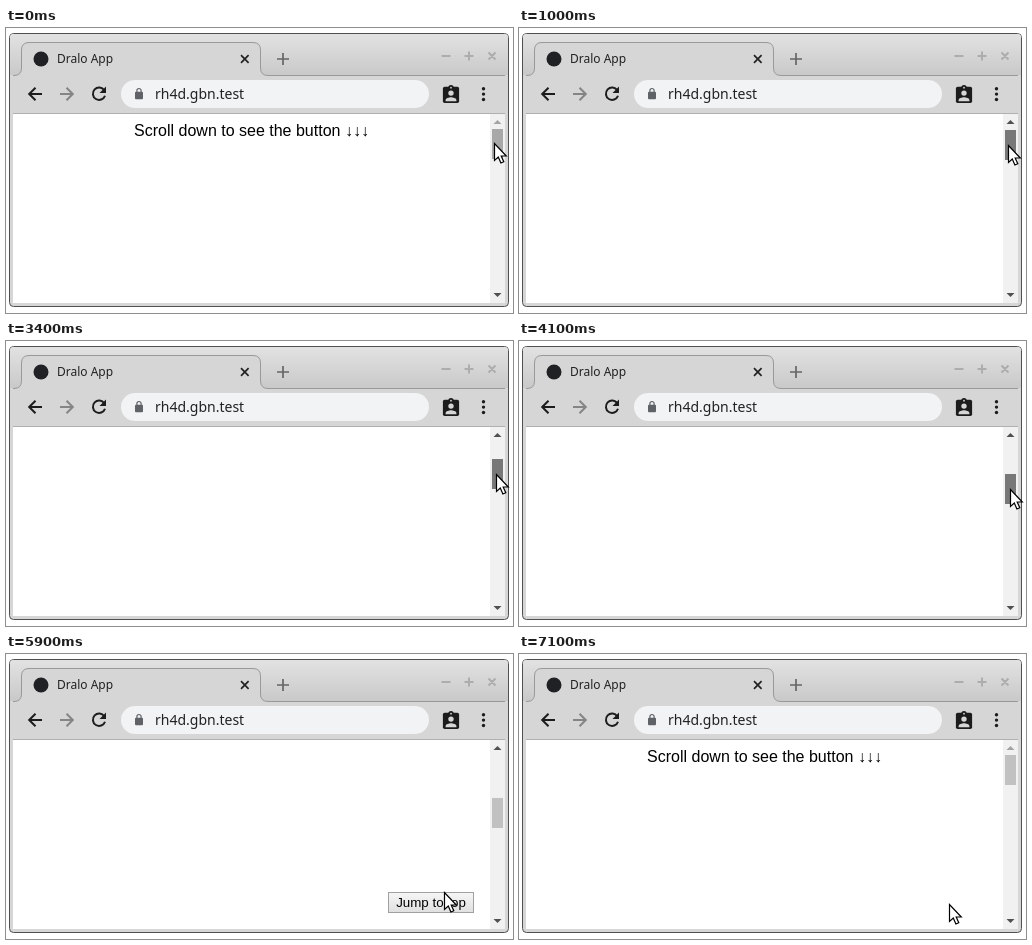
These frames come from a looping animation (507x285 px, 8500 ms). An HTML page:

```html
<!DOCTYPE html>
<html lang="en">
<head>
<meta charset="utf-8">
<title>Scroll demo</title>
<style>
  html, body { margin: 0; width: 100%; height: 100%; overflow: hidden; background: #fff; }
  svg { display: block; width: 100%; height: 100%; }
  .ui { font-family: "Noto Sans", sans-serif; }
  .page { font-family: "Liberation Sans", Arial, sans-serif; text-anchor: middle; }
  .line { fill: none; stroke-width: 2; }
  .thin { stroke-width: 1.7; }
</style>
</head>
<body>
<svg viewBox="0 0 507 285">
  <defs>
    <linearGradient id="titleBar" x2="0" y2="1">
      <stop stop-color="#e2e2e2"/><stop offset="1" stop-color="#c9c9c9"/>
    </linearGradient>
    <linearGradient id="buttonFace" x2="0" y2="1">
      <stop stop-color="#f6f6f6"/><stop offset="1" stop-color="#e0e0e0"/>
    </linearGradient>
    <clipPath id="view"><rect x="7" y="86" width="477" height="189"/></clipPath>
  </defs>

  <!-- Window frame and tab strip -->
  <rect x="3.5" y="5.5" width="499" height="273" rx="4" fill="#d6d6d6" stroke="#505050"/>
  <path d="M4 47V9q0-3 3-3H499q3 0 3 3V47Z" fill="url(#titleBar)"/>
  <path d="M7 47.5H8Q15.5 47.5 15.5 40V22Q15.5 14.5 23 14.5H247Q254.5 14.5 254.5 22V40Q254.5 47.5 262 47.5H499"
        fill="#d6d6d6" stroke="#999"/>
  <circle cx="35" cy="31" r="7.5" fill="#202124"/>
  <text class="ui" x="51" y="35" font-size="12" fill="#222">Dralo App</text>
  <path class="line thin" d="M235 27.2l7.6 7.6m0-7.6l-7.6 7.6" stroke="#222"/>
  <path class="line thin" d="M271 31h12m-6-6v12" stroke="#666"/>
  <path class="line" d="M435.5 28h9M458.5 28h9m-4.5-4.5v9M482.5 24.5l7 7m0-7l-7 7" stroke="#adadad"/>

  <!-- Toolbar -->
  <path class="line" d="M36 66H23.5m6-6.3L23.2 66l6.3 6.3" stroke="#1c1c1c"/>
  <path class="line" d="M54 66H66.5m-6-6.3L66.8 66l-6.3 6.3" stroke="#858585"/>
  <path class="line" d="M98.3 62.3A6.2 6.2 0 1 0 99 67.7" stroke="#1c1c1c"/>
  <path d="M100 58.5v6.500h-6.500Z" fill="#1c1c1c"/>
  <rect x="115" y="52" width="308" height="28" rx="14" fill="#f1f3f4"/>
  <rect x="129" y="63.7" width="8" height="7.5" rx="1" fill="#5f6368"/>
  <path d="M130.9 64v-1.4a2.1 2.1 0 0 1 4.2 0V64" fill="none" stroke="#5f6368" stroke-width="1.2"/>
  <text class="ui" x="149" y="71" font-size="14" fill="#222">rh4d.gbn.test</text>
  <g transform="translate(434.2 56.1) scale(.9)" fill="#1c1c1c">
    <rect x="3" y="3" width="18" height="18" rx="2"/>
    <circle cx="12" cy="4" r="3"/>
    <g fill="#d6d6d6">
      <circle cx="12" cy="4" r="1"/><circle cx="12" cy="10" r="3"/>
      <path d="M6 19v-1.4c0-2 4-3.1 6-3.1s6 1.100 6 3.100V19Z"/>
    </g>
  </g>
  <g fill="#1c1c1c">
    <circle cx="477.5" cy="60.7" r="1.7"/><circle cx="477.5" cy="66.1" r="1.7"/><circle cx="477.5" cy="71.5" r="1.7"/>
  </g>

  <!-- Page -->
  <rect x="7" y="85" width="492" height="1" fill="#b0b0b0"/>
  <rect x="7" y="86" width="477" height="189" fill="#fff"/>
  <g clip-path="url(#view)">
    <text id="hint" class="page" x="245.5" y="108" font-size="16">Scroll down to see the button ↓↓↓</text>
  </g>
  <g id="jump">
    <rect x="382.5" y="238.5" width="85" height="20" fill="url(#buttonFace)" stroke="#a0a0a0"/>
    <text class="page" x="425" y="253" font-size="13.333">Jump to top</text>
  </g>

  <!-- Scrollbar -->
  <rect x="484" y="86" width="15" height="189" fill="#f1f1f1"/>
  <path id="up" d="M487.5 96h8l-4-4Z"/>
  <path d="M487.5 265h8l-4 4Z" fill="#505050"/>
  <rect id="thumb" x="486" width="11" height="30"/>

  <path id="cursor" d="M.5.5V17.5L4.3 14L6.9 20L9.8 18.8L7.2 13H12.3Z" fill="#fff" stroke="#000" stroke-width="1.2"/>
</svg>
<script>
  const LOOP = 8500, TICK = 100, TOP = 101;
  const PRESS = 300, RELEASE = 5400, CLICK = 6500;
  const BUTTON_AT = 134;      // thumb position that reveals the button
  const SCROLL_RATIO = 20;    // page pixels per thumb pixel
  const GRAB = { x: 488, y: 115 }, BUTTON = { x: 430, y: 250 };

  // The drag starts slowly, speeds up and settles: time and thumb y.
  const drag = [[600, TOP], [2400, 107.2], [3200, 114], [4000, 132.2], [5200, 144.4]];

  const [hint, jump, up, thumb, cursor] =
    ["hint", "jump", "up", "thumb", "cursor"].map(id => document.getElementById(id));

  const mix = (a, b, p) => a + (b - a) * p;
  const progress = (time, start, end) => Math.min(1, Math.max(0, (time - start) / (end - start)));
  const easeInOut = p => p * p * (3 - 2 * p);
  const easeOut = p => 1 - (1 - p) ** 1.6;

  function draggedTo(time) {
    let y = TOP;
    for (let i = 1; i < drag.length; i++) {
      y = mix(y, drag[i][1], progress(time, drag[i - 1][0], drag[i][0]));
    }
    return y;
  }

  function cursorAt(time, dragged) {
    const moved = dragged - TOP;
    const glide = easeOut(progress(time, RELEASE, 6100));
    return [
      mix(GRAB.x + Math.ceil(moved / 15), BUTTON.x, glide),
      mix(GRAB.y + Math.ceil(moved), BUTTON.y, glide)
    ].map(Math.round);
  }

  function thumbColor(time) {
    if (time < PRESS) return "#a8a8a8";
    return time <= RELEASE ? "#787878" : "#c1c1c1";
  }

  function draw(now) {
    const time = Math.floor(now % LOOP / TICK) * TICK;
    const dragged = draggedTo(time);
    const y = mix(dragged, TOP, easeInOut(progress(time, CLICK, 7100)));
    thumb.setAttribute("y", Math.floor(y));
    thumb.setAttribute("fill", thumbColor(time));
    up.setAttribute("fill", y > TOP ? "#505050" : "#a3a3a3");
    hint.setAttribute("transform", `translate(0 ${Math.round((TOP - y) * SCROLL_RATIO)})`);
    jump.setAttribute("visibility", y >= BUTTON_AT ? "visible" : "hidden");
    cursor.setAttribute("transform", `translate(${cursorAt(time, dragged)})`);
  }

  const begin = performance.now();
  function loop() {
    draw(performance.now() - begin);
    requestAnimationFrame(loop);
  }
  loop();
</script>
</body>
</html>
```
